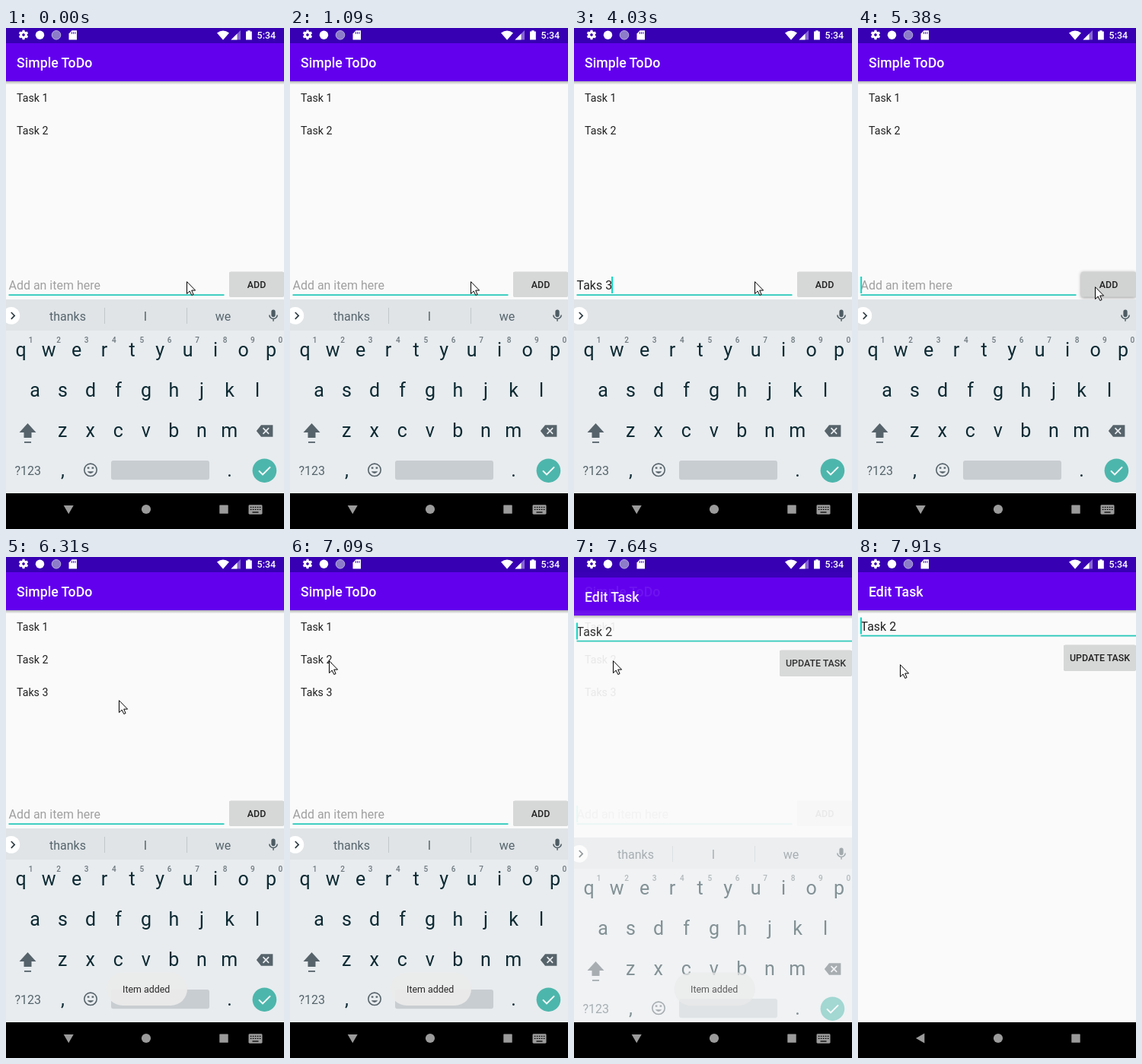
Recreate the animation shown at these times as an HTML page. Size 365 px wide and 659 px high, loop 8 s.

```html
<!DOCTYPE html>
<html lang="en">
<head>
<meta charset="utf-8">
<title>Task list</title>
<style>
  html, body { margin: 0; width: 100%; height: 100%; overflow: hidden; background: #fafafa; }
  svg { display: block; width: 100%; height: 100%; font-family: Roboto, sans-serif; }
  text { white-space: pre; }
  .title { font-size: 17.74px; font-weight: 500; fill: #fff; }
  .item { font-size: 14.2px; fill: #212121; }
  .field { font-size: 15.97px; fill: #212121; }
  .hint { fill: #a0a0a0; }
  .label { font-size: 12.42px; font-weight: 500; fill: #212121; }
  .mid { text-anchor: middle; }
  .button { fill: #d6d7d7; filter: drop-shadow(0 .8px .7px rgba(0,0,0,.22)); }
  .button.pressed { fill: #d1d2d2; filter: drop-shadow(0 1.8px 2px rgba(0,0,0,.4)); }
  .accent { fill: #27c8b9; }
  .caret { fill: #08d6c3; }
  .key { font-size: 25px; fill: #0d2a33; }
  .digit { font-size: 10px; font-weight: 500; fill: #6c787e; }
  .word { font-size: 16px; fill: #56656d; }
</style>
</head>
<body>
<svg viewBox="0 0 365 659" preserveAspectRatio="none">
  <defs>
    <linearGradient id="shade" x2="0" y2="1">
      <stop offset="0" stop-color="#000" stop-opacity=".28"/>
      <stop offset="1" stop-color="#000" stop-opacity="0"/>
    </linearGradient>
    <g id="chrome">
      <rect width="365" height="659" fill="#fafafa"/>
      <rect y="70" width="365" height="4.5" fill="url(#shade)"/>
      <rect y="20" width="365" height="50" fill="#6200ee"/>
      <rect width="365" height="20" fill="#3700b3"/>
    </g>
  </defs>

  <g id="listScreen">
    <use href="#chrome"/>
    <text class="title" x="14" y="52.3">Simple ToDo</text>
    <text class="item" x="14" y="97.4">Task 1</text>
    <text class="item" x="14" y="140.4">Task 2</text>
    <text class="item" id="newItem" x="14" y="183.4">Taks 3</text>
    <text class="field" id="entry" x="3.5" y="344.2"></text>
    <rect id="composing" x="3.5" y="345.6" height="1" fill="#212121"/>
    <rect class="accent" x="3.5" y="350.3" width="283" height="1.8"/>
    <rect class="caret" id="caret" y="327" width="2" height="22"/>
    <rect class="button" id="add" x="293" y="320.7" width="72" height="33" rx="2"/>
    <text class="label mid" x="329" y="341.8">ADD</text>
  </g>

  <g id="editScreen">
    <use href="#chrome"/>
    <text class="title" x="14" y="52.3">Edit Task</text>
    <text class="field" x="3.5" y="96.6">Task 2</text>
    <rect class="accent" x="3.5" y="102.7" width="362" height="1.8"/>
    <rect class="caret" x="3" y="79.5" width="2" height="22"/>
    <rect class="button" x="270" y="115.7" width="95" height="34" rx="2"/>
    <text class="label mid" x="317.6" y="137">UPDATE TASK</text>
  </g>

  <g id="status" fill="#fff">
    <g transform="translate(23 9)">
      <g id="teeth"></g>
      <circle r="3.4" fill="none" stroke="#fff" stroke-width="2.8"/>
    </g>
    <circle cx="44.5" cy="9.3" r="5.7"/>
    <circle cx="66" cy="9.3" r="5.8" fill="#8c7cc9" stroke="#b9addf"/>
    <path d="M86.5 3.2H93V15.4H82.5V7.4Z"/>
    <path d="M86.3 5.2v2.6M88.6 5.2v2.6M90.9 5.2v2.6" stroke="#3700b3" stroke-width="1"/>
    <path d="M277 6.6Q285 .4 293 6.6L285 15.8Z"/>
    <path d="M295.5 15.5L308 3V15.5Z" opacity=".4"/>
    <path d="M295.5 15.5L303.5 7.5V15.5Z"/>
    <path d="M315 4.6h2.2V3.2h3.4v1.4h2.2V15.5H315Z"/>
    <text class="label" x="329.6" y="14" style="fill:#fff">5:34</text>
  </g>

  <g id="keyboard">
    <rect y="357" width="365" height="255" fill="#e8ecef"/>
    <rect y="357" width="365" height="41" fill="#e0e4e7"/>
    <circle cx="6.8" cy="378.4" r="11.4" fill="#fff"/>
    <path d="M6.8 374l4.4 4.4-4.4 4.4" fill="none" stroke="#2d3b42" stroke-width="1.7"/>
    <g id="words">
      <path d="M129.5 368v21M237.5 368v21" stroke="#c2c8cb"/>
      <text class="word mid" x="81" y="384.5"></text>
      <text class="word mid" x="183" y="384.5"></text>
      <text class="word mid" x="285" y="384.5"></text>
    </g>
    <g stroke="#4d5b63" fill="none" stroke-width="1.5">
      <rect x="349.1" y="371.3" width="3.8" height="8.2" rx="1.9" fill="#4d5b63"/>
      <path d="M345.8 377.5a5.2 5 0 0 0 10.4 0M351 382.5v3.3"/>
    </g>
    <g id="keys"></g>
    <g fill="#56636a">
      <path d="M28.5 520L39.5 532H33.5V539H23.5V532H17.5Z"/>
      <rect x="24" y="544" width="9" height="1.8"/>
      <path d="M335 522.3H350.4V537.8H335L328.8 530Z"/>
      <path d="M337.5 526.2l7.6 7.6m0-7.6l-7.6 7.6" stroke="#e8ecef" stroke-width="1.7"/>
    </g>
    <text class="word mid" x="28.7" y="587.5">?123</text>
    <text class="key mid" x="74.5" y="590">,</text>
    <text class="key mid" x="293.5" y="590">.</text>
    <g transform="translate(111 581.3)" stroke="#56636a" stroke-width="1.6" fill="none">
      <circle r="8.2"/>
      <path d="M-4.3 2Q0 7.4 4.3 2Z" fill="#56636a" stroke="none"/>
      <path d="M-4.2-2.7h2.6M1.6-2.7h2.6" stroke-width="2.3"/>
    </g>
    <rect x="138" y="569" width="129" height="25.3" rx="3" fill="#c8cdd1"/>
    <circle cx="339.4" cy="582.2" r="15.8" fill="#4db6ac"/>
    <path d="M332 582.4l5 5 10-10" fill="none" stroke="#fff" stroke-width="2"/>
  </g>

  <g id="nav" fill="#9b9b9b">
    <rect y="612" width="365" height="47" fill="#000"/>
    <path id="back"/>
    <circle cx="184" cy="633" r="6.1"/>
    <rect x="280.3" y="627.4" width="11.4" height="11.4" rx=".6"/>
    <g id="switcher">
      <rect x="318.5" y="627.3" width="18" height="12.4" rx="1.4"/>
      <path d="M320.8 630.4h14M320.8 633.4h14" stroke="#000" stroke-width="1.4" stroke-dasharray="1.6 1.4"/>
      <path d="M323.5 637h8" stroke="#000" stroke-width="1.3"/>
    </g>
  </g>

  <g id="toast">
    <rect x="131.5" y="546.5" width="106.5" height="43.5" rx="21.7" fill="#ebebeb"/>
    <text class="label mid" x="184.2" y="573" style="font-weight:400">Item added</text>
  </g>

  <path id="pointer" d="M.5.7V16.6L4.2 13.1L6.8 18.5L9.1 17.5L6.7 12.1H11.6Z" fill="#fff" stroke="#000"/>
</svg>
<script>
const LOOP = 8000;
const $ = id => document.getElementById(id);
const set = (el, attrs) => {
  for (const name in attrs) el.setAttribute(name, attrs[name]);
};
const show = (el, on) => set(el, { visibility: on ? 'visible' : 'hidden' });

const label = (cls, x, y, s) => `<text class="${cls} mid" x="${x}" y="${y}">${s}</text>`;
const row = (letters, x0, y) =>
  [...letters].map((c, i) => label('key', x0 + i * 36.5, y, c)).join('');

$('keys').innerHTML =
  row('qwertyuiop', 19.6, 431.7) + row('asdfghjkl', 38, 484.7) + row('zxcvbnm', 74.3, 537.8) +
  [...'1234567890'].map((c, i) => label('digit', 32.7 + i * 36.4, 414.3, c)).join('');
$('teeth').innerHTML = [0, 60, 120].map(a =>
  `<rect x="-1.5" y="-6.3" width="3" height="12.6" transform="rotate(${a})"/>`).join('');
$('teeth').innerHTML += '<circle r="2" fill="#3700b3"/>';

// Each step overrides part of the state before it.
const start = {
  text: '', composing: false, caret: false, words: 'thanks,I,we', mouse: [237, 333],
  pressed: false, added: false, toast: 0, edit: [0, 0], keyboard: [0, 1]
};
const steps = [
  [520, { caret: true }],
  [1090, { caret: false }],
  [1650, { caret: true }],
  [2020, { caret: false }],
  [2330, { caret: true, text: 'T', composing: true, words: 'T,Thanks,Thank' }],
  [2640, { text: 'Ta', words: 'Ta,Thanks,Thank' }],
  [2790, { text: 'Tak', words: 'Tak,Take,Taking' }],
  [2940, { text: 'Taks', words: 'Taks,Task,Talk' }],
  [3470, { caret: false }],
  [3750, { caret: true, text: 'Taks ', composing: false, words: 'and,to,for' }],
  [4030, { text: 'Taks 3', words: '' }],
  [4460, { caret: false }],
  [4860, { caret: true, mouse: [278, 337] }],
  [4980, { mouse: [306, 340] }],
  [5130, { mouse: [311, 340] }],
  [5380, { text: '', pressed: true }],
  [5530, { added: true, words: 'thanks,I,we', toast: .25 }],
  [5650, { pressed: false, toast: .7 }],
  [5770, { toast: .95 }],
  [5890, { caret: false, mouse: [307, 336] }],
  [6010, { mouse: [287, 322] }],
  [6160, { mouse: [176, 263] }],
  [6310, { mouse: [148, 188] }],
  [6460, { caret: true, mouse: [116, 161] }],
  [6580, { mouse: [94, 148] }],
  [6700, { mouse: [78, 141] }],
  [6820, { mouse: [66, 137] }],
  [6940, { caret: false, mouse: [59, 136] }],
  [7090, { mouse: [51, 136] }],
  [7520, { caret: true, edit: [42, .3] }],
  [7640, { edit: [7, .92], keyboard: [12, .5], toast: .7 }],
  [7760, { edit: [0, 1], keyboard: [0, 0], toast: .2 }],
  [7910, { mouse: [55, 141], toast: 0 }]
];

const words = [...$('words').querySelectorAll('text')];
const shift = ([dy, opacity]) => ({ transform: `translate(0 ${dy})`, opacity });

function render(s) {
  const entry = $('entry');
  entry.textContent = s.text || 'Add an item here';
  entry.classList.toggle('hint', !s.text);
  const width = s.text ? entry.getComputedTextLength() : 0;
  set($('caret'), { x: s.text ? 2.5 + width : 3.2 });
  show($('caret'), s.caret);
  set($('composing'), { width });
  show($('composing'), s.composing);
  $('add').classList.toggle('pressed', s.pressed);
  show($('newItem'), s.added);

  show($('words'), s.words);
  const list = s.words.split(',');
  words.forEach((el, i) => { el.textContent = list[i] || ''; });

  set($('editScreen'), shift(s.edit));
  set($('keyboard'), shift(s.keyboard));
  const typing = s.keyboard[1] > 0;
  show($('switcher'), typing);
  set($('back'), { d: typing ? 'M75.7 628H88.7L82.2 639.2Z' : 'M76 633L87.3 626.6V639.4Z' });
  set($('toast'), { opacity: s.toast });
  set($('pointer'), { transform: `translate(${s.mouse})` });
}

let shown = -1;
const origin = performance.now();
function tick() {
  const t = (performance.now() - origin) % LOOP;
  const count = steps.filter(([at]) => at <= t).length;
  if (count !== shown) {
    shown = count;
    render(Object.assign({}, start, ...steps.slice(0, count).map(step => step[1])));
  }
  requestAnimationFrame(tick);
}
tick();
</script>
</body>
</html>
```
